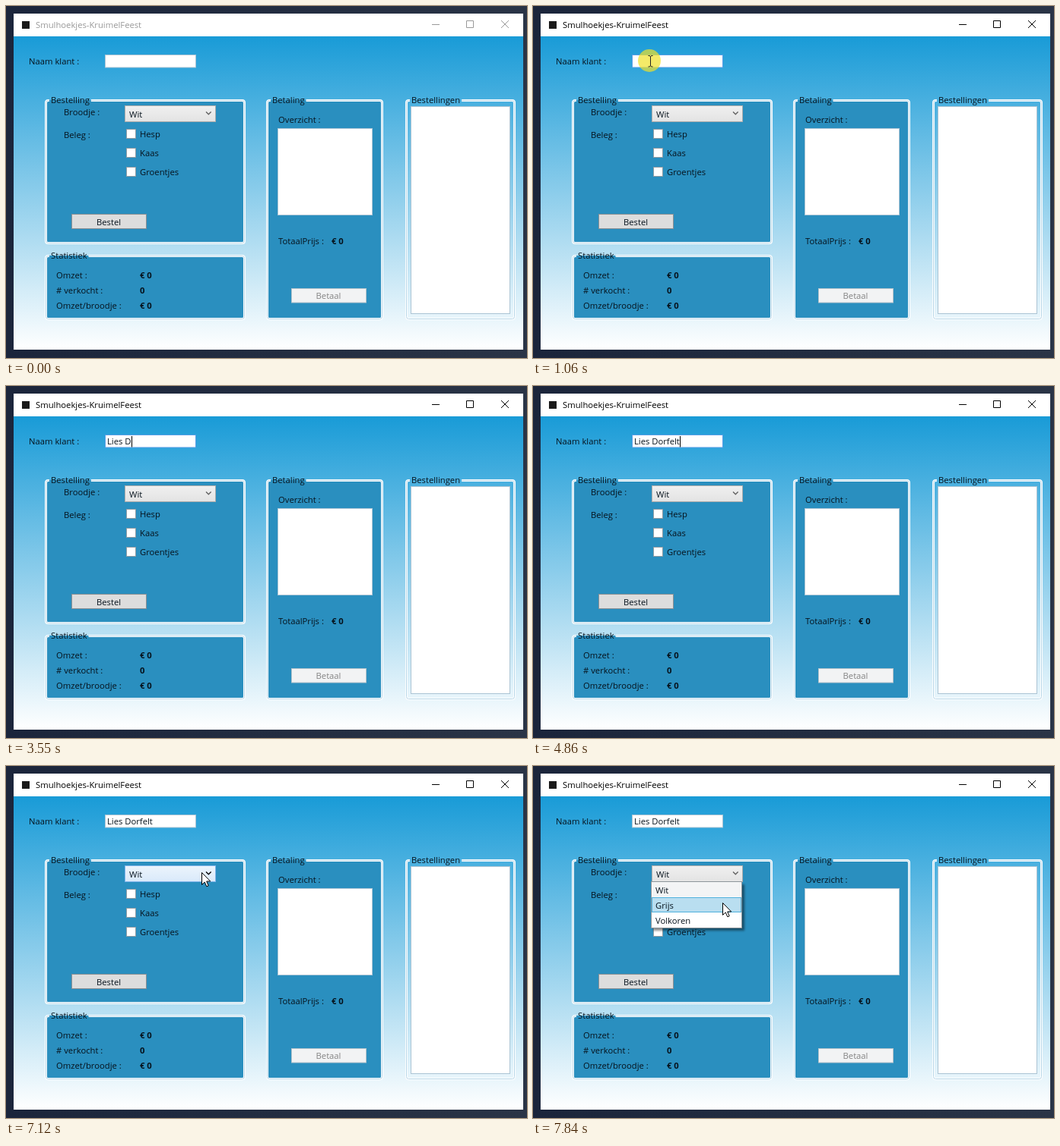
Animation of 685 by 464 pixels, one loop 8 s. Source, as an HTML page:

```html
<!DOCTYPE html>
<html lang="nl">
<head>
<meta charset="utf-8">
<title>Smulhoekjes-KruimelFeest</title>
<style>
  html, body { margin: 0; width: 100%; height: 100%; overflow: hidden; background: #1d2639; }
  svg { display: block; width: 685px; height: 464px; }
  text { font: 11.25px "Open Sans", "Noto Sans", sans-serif; fill: #06121c; white-space: pre; }
  .bold { font-weight: 700; }
  .mid { text-anchor: middle; }
  .field { fill: #fff; stroke: #abc4d4; }
  .frame { fill: none; stroke: #fff; stroke-width: 3; }
  .frame.core { stroke: #b5d6e8; stroke-width: 1; }
  .panel { fill: #2a8fbf; }
  .chrome { --ink: #999; }
  .chrome.active { --ink: #000; }
  .chrome text { fill: var(--ink); }
  .chrome path { fill: none; stroke: var(--ink); }
  #combo rect { fill: url(#plain); stroke: #acacac; }
  #combo path { fill: none; stroke: #606060; stroke-width: 1.3; }
  #combo.hover rect { fill: url(#hover); stroke: #7eb4ea; }
  #combo.hover path { stroke: #000; }
  #name.hover { stroke: #7eb4ea; }
  #name.focus { stroke: #569de5; }
  .row { fill: none; stroke: none; }
  .row.picked { fill: #f3f4f5; }
  .row.hover { fill: #b9def0; stroke: #4fb0dc; }
</style>
</head>
<body>
<svg viewBox="0 0 685 464">
  <defs>
    <linearGradient id="desk"><stop stop-color="#1b253b"/><stop offset="1" stop-color="#2a3446"/></linearGradient>
    <linearGradient id="sky" x2="0" y2="1"><stop stop-color="#199bd7"/><stop offset="1" stop-color="#fff"/></linearGradient>
    <linearGradient id="plain" x2="0" y2="1"><stop stop-color="#f0f0f0"/><stop offset="1" stop-color="#e3e3e3"/></linearGradient>
    <linearGradient id="hover" x2="0" y2="1"><stop stop-color="#ecf4fc"/><stop offset="1" stop-color="#d9e9fa"/></linearGradient>
    <filter id="blur"><feGaussianBlur stdDeviation="1.5"/></filter>
  </defs>

  <rect width="685" height="464" fill="url(#desk)"/>
  <rect x="10" y="10" width="670" height="30" fill="#fff"/>
  <rect x="10" y="40" width="670" height="413" fill="url(#sky)"/>

  <g class="chrome" id="chrome">
    <rect x="21" y="20" width="10" height="10" fill="#1a1a1a"/>
    <text x="39" y="29">Smulhoekjes-KruimelFeest</text>
    <path d="M560 24.5h10M605.5 19.5h9v9h-9zM651 19l10 10M661 19l-10 10"/>
  </g>

  <g id="groups"></g>
  <g id="labels"></g>

  <rect class="field" id="name" x="130.500" y="64.500" width="119" height="16.500"/>
  <text id="typed" x="133" y="77"></text>
  <rect id="caret" y="66" width="1" height="14.500"/>

  <g id="combo">
    <rect x="156.500" y="131.500" width="119" height="21"/>
    <path d="M263 139.500l3.300 3.300 3.300-3.300"/>
    <text x="162" y="147">Wit</text>
  </g>
  <g id="checks"></g>

  <rect x="86.500" y="274.500" width="98" height="19" fill="#ddd" stroke="#8a8f93"/>
  <text class="mid" x="135" y="289">Bestel</text>
  <rect class="field" x="357.500" y="161.500" width="124" height="114"/>
  <rect x="375.500" y="372.500" width="98" height="18.500" fill="#f2f3f4" stroke="#b4c3cb"/>
  <text class="mid" x="424" y="386" style="fill:#838383">Betaal</text>
  <rect class="field" x="532.500" y="132.500" width="130" height="273"/>

  <g id="popup">
    <rect x="158" y="156" width="120" height="61" fill="#000" opacity=".45" filter="url(#blur)"/>
    <rect x="155.500" y="152.500" width="119" height="61" fill="#fff" stroke="#8c9499"/>
  </g>

  <circle id="ring" r="15" fill="#f0e128"/>
  <g id="mouse">
    <path id="arrow" d="M.5.5V16.500L4.200 13 6.800 18.800 9.200 17.800 6.700 12H11.700Z" fill="#fff" stroke="#000"/>
    <path id="beam" d="M-2.500-6.500H-1L.5-5.500 2-6.500H3.500M.5-5.500V7M-2.500 8H-1L.5 7 2 8H3.500" fill="none" stroke="#222"/>
  </g>
</svg>

<script>
const LOOP = 8000;
const NAME = "Lies\u00a0Dorfelt";
const KEYS = [2470, 2770, 2870, 2950, 3090, 3550, 3950, 4100, 4320, 4550, 4780, 4860];
const PATH = [ // time, x, y
  [130, 458, 412], [680, 154, 72], [5789, 154, 72],
  [5790, 160, 73], [5880, 188, 82], [5960, 220, 105], [6050, 235, 121],
  [6190, 247, 155], [6420, 247, 155], [6490, 257, 151], [6720, 257, 151],
  [6890, 257, 140], [7380, 257, 140], [7670, 249, 177], [7839, 249, 177], [7840, 249, 180]
];
const CLICKS = [[900, 1290], [7200, 7440]];

const $ = id => document.getElementById(id);

function add(parent, tag, attrs, content = "") {
  const el = document.createElementNS("http://www.w3.org/2000/svg", tag);
  for (const key in attrs) el.setAttribute(key, attrs[key]);
  el.textContent = content;
  return parent.appendChild(el);
}

const label = (x, y, content, cls = "", parent = $("labels")) =>
  add(parent, "text", { x, y, class: cls }, content);

function group(x, y, w, h, title, filled = true) {
  const box = $("groups");
  if (filled) add(box, "rect", { x: x + 1, y: y + 1, width: w - 2, height: h - 2, rx: 3, class: "panel" });
  const width = label(x + 8, y + 5, title, "", box).getComputedTextLength();
  const l = x + 1.5, t = y + 1.5, r = x + w - 1.5, b = y + h - 1.5;
  const d = `M${x + 10 + width} ${t}H${r - 3}q3 0 3 3V${b - 3}q0 3-3 3H${l + 3}q-3 0-3-3V${t + 3}q0-3 3-3H${x + 6}`;
  add(box, "path", { d, class: "frame" });
  add(box, "path", { d, class: "frame core" });
}

group(51, 123, 264, 191, "Bestelling");
group(51, 328, 264, 86, "Statistiek");
group(342, 123, 154, 291, "Betaling");
group(525, 123, 145, 291, "Bestellingen", false);

label(30, 77, "Naam klant :");
label(76, 144, "Broodje :");
label(76, 174, "Beleg :");
label(358, 154, "Overzicht :");
label(358, 314, "TotaalPrijs :");
label(428, 314, "€ 0", "bold");
[["Omzet :", "€ 0"], ["# verkocht :", "0"], ["Omzet/broodje :", "€ 0"]].forEach(([key, value], i) => {
  label(66, 359 + 20 * i, key);
  label(176, 359 + 20 * i, value, "bold");
});
["Hesp", "Kaas", "Groentjes"].forEach((item, i) => {
  const y = 162.5 + 25 * i;
  add($("checks"), "rect", { x: 158.5, y, width: 12, height: 12, fill: "#fff", stroke: "#8f9ba3" });
  label(176, y + 10.5, item, "", $("checks"));
});
const rows = ["Wit", "Grijs", "Volkoren"].map((item, i) => {
  const row = add($("popup"), "rect", { x: 156.5, y: 153.5 + 20 * i, width: 117, height: 19, class: "row" });
  label(161, 167.5 + 20 * i, item, "", $("popup"));
  return row;
});

const between = (t, a, b) => t >= a && t < b;
const show = (el, on) => el.setAttribute("visibility", on ? "visible" : "hidden");

function mouseAt(t) {
  const i = PATH.findIndex(p => p[0] > t);
  if (i === 0) return PATH[0].slice(1);
  if (i < 0) return PATH[PATH.length - 1].slice(1);
  const [t0, x0, y0] = PATH[i - 1], [t1, x1, y1] = PATH[i];
  let k = (t - t0) / (t1 - t0);
  if (i === 1) k = k * k * (3 - 2 * k);
  return [x0 + (x1 - x0) * k, y0 + (y1 - y0) * k];
}

function draw(t) {
  const [x, y] = mouseAt(t);
  const seen = t >= 130 && !between(t, 2470, 5790);
  const inside = (l, top, r, b) => seen && x >= l && x <= r && y >= top && y <= b;
  const overName = inside(130, 64, 250, 82);
  const open = t >= 7200;

  $("chrome").classList.toggle("active", t >= 830);
  $("name").classList.toggle("hover", overName);
  $("name").classList.toggle("focus", between(t, 830, 7040));
  $("combo").classList.toggle("hover", !open && inside(156, 131, 276, 153));

  const typed = NAME.slice(0, KEYS.filter(k => k <= t).length);
  if ($("typed").textContent !== typed) $("typed").textContent = typed;
  const width = typed ? $("typed").getComputedTextLength() : 0;
  $("caret").setAttribute("x", Math.round(133 + width));
  show($("caret"), between(t, 1160, 1690) || between(t, 2220, 5470) || between(t, 6000, 6490));

  show($("popup"), open);
  const current = Math.floor((y - 153) / 20);
  rows.forEach((row, i) => {
    row.classList.toggle("hover", i === current);
    row.classList.toggle("picked", i === 0 && current !== 0);
  });

  const click = CLICKS.find(([a, b]) => between(t, a, b));
  show($("ring"), click);
  if (click) {
    $("ring").setAttribute("transform", `translate(${x - 1} ${y})`);
    $("ring").setAttribute("opacity", Math.min(0.7, (click[1] - t) / 150));
  }

  $("mouse").setAttribute("transform", `translate(${Math.round(x)} ${Math.round(y)})`);
  show($("arrow"), seen && !overName);
  show($("beam"), seen && overName);
}

const start = performance.now();
function tick() {
  draw((performance.now() - start) % LOOP);
  requestAnimationFrame(tick);
}
tick();
</script>
</body>
</html>
```
